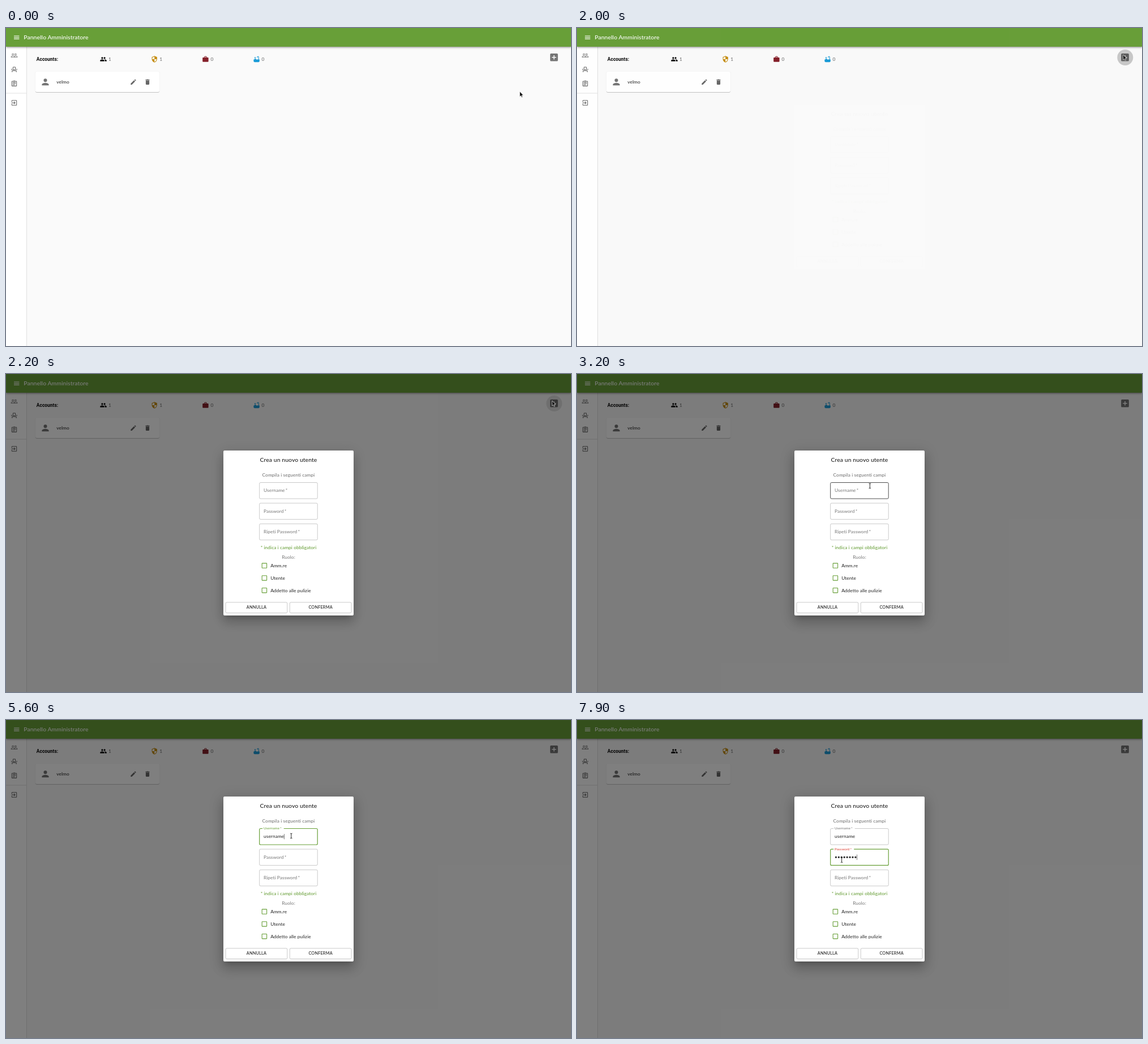
Recreate the animation shown at these times as an HTML page. Size 998x561 px, loop 8 s.

```html
<!DOCTYPE html>
<html lang="it">
<head>
<meta charset="utf-8">
<title>Pannello Amministratore</title>
<style>
html, body { margin: 0; width: 998px; height: 561px; overflow: hidden; background: #fafafa; }
body { position: relative; }
div, svg { position: absolute; left: 0; top: 0; }
svg { width: 998px; height: 561px; }
text { font: 400 8.32px Lato, Roboto, sans-serif; letter-spacing: .00938em; white-space: pre; }
.title { font-size: 10.4px; font-weight: 500; letter-spacing: .0075em; }
.head { font-family: Roboto, Arial, sans-serif; font-weight: 700; }
.mid { text-anchor: middle; }
.med { font-weight: 500; }
.button { font-size: 7.28px; font-weight: 500; letter-spacing: .02857em; text-anchor: middle; }
.help { font-size: 6.24px; letter-spacing: .03333em; }
#drawer { width: 37.4px; height: 561px; background: #fff; border-right: 1px solid #e0e0e0; box-sizing: border-box; }
#bar { width: 998px; height: 33.3px; background: #689f38;
  box-shadow: 0 1px 2px -.5px #0003, 0 2.1px 2.6px #00000024, 0 .5px 5.2px #0000001f; }
#card { left: 52px; top: 76.8px; width: 218.8px; height: 36.2px; background: #fff; border-radius: 2px;
  box-shadow: 0 1px .6px -.5px #0003, 0 .5px .6px #00000024, 0 .5px 1.6px #0000001f; }
#scrim { width: 998px; height: 561px; background: rgba(0, 0, 0, .5); }
#box { left: 383.6px; width: 230.8px; background: #fff; border-radius: 2px;
  box-shadow: 0 5.7px 7.8px -3.6px #0003, 0 12.5px 19.8px 1.6px #00000024, 0 4.7px 23.9px 4.2px #0000001f; }
</style>
</head>
<body>
<div id="drawer"></div>
<div id="bar"></div>
<div id="card"></div>
<svg id="page"></svg>
<svg><circle id="ripple" cx="968.3" cy="52" r="14"/></svg>
<div id="modal">
  <div id="scrim"></div>
  <div id="box"></div>
  <svg id="form"></svg>
</div>
<svg id="pointer"></svg>
<script>
const LOOP = 8000, STEP = 100;
const INK = 'rgba(0,0,0,.87)', GREY = 'rgba(0,0,0,.54)', GREEN = [104, 159, 56], RED = [220, 67, 56];
const $ = id => document.getElementById(id);
const clamp = v => Math.max(0, Math.min(1, v));
const span = (t, a, b) => clamp((t - a) / (b - a));
const smooth = k => k * k * (3 - 2 * k);
const mix = (a, b, k) => a + (b - a) * k;
const rgb = k => `rgb(${GREEN.map((g, i) => Math.round(mix(g, RED[i], k)))})`;

// Material standard curve, cubic-bezier(.4, 0, .2, 1)
function standard(x) {
  let lo = 0, hi = 1, u = .5;
  for (let i = 0; i < 24; i++) {
    u = (lo + hi) / 2;
    const bx = 1.2 * u * (1 - u) ** 2 + .6 * u * u * (1 - u) + u ** 3;
    if (bx < x) lo = u; else hi = u;
  }
  return 3 * u * u * (1 - u) + u ** 3;
}

const text = (x, y, s, cls = '', fill = INK, more = '') =>
  `<text x="${x}" y="${y}" class="${cls}" fill="${fill}" ${more}>${s}</text>`;
const icon = (name, cx, cy, fill, size = 12.5) =>
  `<path transform="translate(${cx - size / 2} ${cy - size / 2}) scale(${size / 24})" fill="${fill}" d="${icons[name]}"/>`;
const rect = (x, y, w, h, stroke, width, r = 2) =>
  `<rect x="${x}" y="${y}" width="${w}" height="${h}" rx="${r}" fill="none" stroke="${stroke}" stroke-width="${width}"/>`;

const icons = {
  menu: 'M3 18h18v-2H3zm0-5h18v-2H3zm0-7v2h18V6z',
  people: 'M16 11a3 3 0 1 0 0-6 3 3 0 0 0 0 6zm-8 0a3 3 0 1 0 0-6 3 3 0 0 0 0 6zm0 2c-2.33 0-7 1.17-7 3.5V19h14v-2.5c0-2.33-4.67-3.5-7-3.5zm8 0c-.29 0-.62.02-.97.05 1.16.84 1.97 1.97 1.97 3.45V19h6v-2.5c0-2.33-4.67-3.5-7-3.5z',
  group: 'M16.5 13c-1.2 0-3.07.34-4.5 1-1.43-.67-3.3-1-4.5-1C5.33 13 1 14.08 1 16.25V19h22v-2.75c0-2.17-4.33-3.25-6.5-3.25zm-4 4.5h-10v-1.25c0-.54 2.56-1.75 5-1.75s5 1.21 5 1.75v1.25zm9 0H14v-1.25c0-.46-.2-.86-.52-1.22.88-.3 1.96-.53 3.02-.53 2.44 0 5 1.21 5 1.75v1.25zM7.5 12a3.5 3.5 0 1 0 0-7 3.5 3.5 0 0 0 0 7zm0-5.5a2 2 0 1 1 0 4 2 2 0 0 1 0-4zm9 5.5a3.5 3.5 0 1 0 0-7 3.5 3.5 0 0 0 0 7zm0-5.5a2 2 0 1 1 0 4 2 2 0 0 1 0-4z',
  seat: 'M15 5v7H9V5h6m0-2H9c-1.1 0-2 .9-2 2v9h10V5c0-1.1-.9-2-2-2zm7 7h-3v3h3zM5 10H2v3h3zm15 5H4v6h2v-4h12v4h2z',
  tasks: 'M7 15h7v2H7zm0-4h10v2H7zm0-4h10v2H7zm12-4h-4.18a3 3 0 0 0-5.64 0H5a2 2 0 0 0-2 2v14a2 2 0 0 0 2 2h14a2 2 0 0 0 2-2V5a2 2 0 0 0-2-2zm-7-.25a.75.75 0 1 1 0 1.5.75.75 0 0 1 0-1.5zM19 19H5V5h14z',
  exit: 'M10.09 15.59L11.5 17l5-5-5-5-1.41 1.41L12.67 11H3v2h9.67zM19 3H5a2 2 0 0 0-2 2v4h2V5h14v14H5v-4H3v4a2 2 0 0 0 2 2h14a2 2 0 0 0 2-2V5a2 2 0 0 0-2-2z',
  shield: 'M12 1L3 5v6c0 5.55 3.84 10.74 9 12 5.16-1.26 9-6.45 9-12V5zm0 10.99h7c-.53 4.12-3.28 7.79-7 8.94V12H5V6.3l7-3.11z',
  work: 'M20 6h-4V4a2 2 0 0 0-2-2h-4a2 2 0 0 0-2 2v2H4a2 2 0 0 0-2 2v11a2 2 0 0 0 2 2h16a2 2 0 0 0 2-2V8a2 2 0 0 0-2-2zm-6 0h-4V4h4z',
  bath: 'M7 5a2 2 0 1 1 0 4 2 2 0 0 1 0-4zM20 13V4.83C20 3.27 18.73 2 17.17 2c-.75 0-1.47.3-2 .83l-1.25 1.25c-.5-.15-1.1-.1-1.59.24l2.76 2.76c.34-.5.4-1.1.25-1.59l1.25-1.25c.5-.5 1.41-.15 1.41.59V13h-6.85c-.3-.21-.57-.45-.82-.72l-1.4-1.55C7.6 9.3 5 10.2 5 12.25V13H2v6a2 2 0 0 0 2 2c0 .55.45 1 1 1h14c.55 0 1-.45 1-1a2 2 0 0 0 2-2v-6z',
  person: 'M12 12a4 4 0 1 0 0-8 4 4 0 0 0 0 8zm0 2c-2.67 0-8 1.34-8 4v2h16v-2c0-2.66-5.33-4-8-4z',
  edit: 'M3 17.25V21h3.75L17.81 9.94l-3.75-3.75zM20.71 7.04a1 1 0 0 0 0-1.41l-2.34-2.34a1 1 0 0 0-1.41 0l-1.83 1.83 3.75 3.75z',
  trash: 'M6 19a2 2 0 0 0 2 2h8a2 2 0 0 0 2-2V7H6zM19 4h-3.5l-1-1h-5l-1 1H5v2h14z',
  add: 'M19 3H5a2 2 0 0 0-2 2v14a2 2 0 0 0 2 2h14a2 2 0 0 0 2-2V5a2 2 0 0 0-2-2zm-2 10h-4v4h-2v-4H7v-2h4V7h2v4h4z'
};

function drawPage() {
  const counters = [['people', '#000', 1], ['shield', '#c68f12', 1], ['work', '#85202a', 0], ['bath', '#1a9bd7', 0]];
  const side = [['group', 48.3], ['seat', 73.2], ['tasks', 98.2], ['exit', 132]];
  $('page').innerHTML =
    icon('menu', 18.7, 16.5, '#fff') + text(31.2, 20, 'Pannello Amministratore', 'title', '#fff') +
    side.map(([n, y]) => icon(n, 14.5, y, '#666')).join('') +
    '<path d="M0 115H37" stroke="#e0e0e0"/>' +
    text(53.8, 58.3, 'Accounts:', 'head', '#000') +
    counters.map(([n, c, v], i) => icon(n, 172 + 90.2 * i, 55, c) + text(181 + 90.2 * i, 58.1, v, '', '#666')).join('') +
    icon('person', 69.5, 95.2, '#757575', 18.2) + text(89.2, 97.8, 'velmo', 'med', '#333') +
    icon('edit', 225, 95.2, '#666') + icon('trash', 250, 95.2, '#666') +
    icon('add', 968, 51.7, '#757575', 18.2);
}

// focus / blur / error on / error off, in ms
const fields = [
  { label: 'Username', top: 191.2, gap: 37.5, focus: 3350, blur: 6200, on: 4000, off: 4900,
    keys: [4000, 4200, 4400, 4600, 4900, 5000, 5100, 5200], help: ['Min 5 caratteri, max 16'] },
  { label: 'Password', top: 227.6, gap: 36, focus: 6150, blur: LOOP, on: 6700, off: 7900, secret: true,
    keys: [6700, 6900, 7100, 7300, 7400, 7600, 7700, 7900], help: ['Lunghezza password', 'necessaria da 8 a 16 caratteri'] },
  { label: 'Ripeti Password', top: 264, gap: 0, focus: LOOP, blur: LOOP, on: LOOP, off: LOOP, keys: [], help: [] }
];
const LEFT = 447.4, WIDE = 103.1, HIGH = 29.1, WORD = 'username';

// Row offsets caused by the help text under a failing field
function layout(t) {
  const bad = fields.findIndex(f => t >= f.on && t < f.off);
  const extra = bad < 0 ? 0 : 1.5 + 10.36 * fields[bad].help.length;
  return { bad, extra, up: -extra / 2, shift: i => (bad >= 0 && i > bad ? extra / 2 : -extra / 2) };
}

const route = [
  [0, 907.5, 112], [900, 907.5, 112], [1700, 964.6, 47], [2200, 964.6, 47], [2400, 699, 136],
  [2600, 699, 136], [3300, 506.7, 201], [5500, 506.7, 201], [6100, 467.6, 247], [LOOP, 467.6, 247]
];
function cursorAt(t) {
  const i = route.findIndex((p, n) => n && t <= p[0]);
  const [a, x, y] = route[i - 1], [b, u, v] = route[i];
  const k = smooth(span(t, a, b));
  return [mix(x, u, k), mix(y, v, k)];
}
function fieldUnder([x, y], lay) {
  return fields.findIndex((f, i) => {
    const top = f.top + lay.shift(i);
    return x > LEFT && x < LEFT + WIDE && y > top && y < top + HIGH;
  });
}

function drawField(f, i, t, lay, hover) {
  const active = t >= f.focus && t < f.blur, bad = lay.bad === i;
  const up = smooth(span(t, f.focus, f.focus + 150));
  const redness = span(t, f.on, f.on + 200) - span(t, f.off, f.off + 200);
  const line = bad ? rgb(1) : active ? rgb(0) : hover ? '#212121' : 'rgba(0,0,0,.27)';
  const count = f.keys.filter(k => t >= k).length;
  const base = f.top + 17.2;
  let s = rect(LEFT + .3, f.top + .3, WIDE - .6, HIGH - .6, line, active ? 1.2 : .8);
  if (up) s += `<path d="M453.2 ${f.top + .3}h${f.gap * up}" stroke="#fff" stroke-width="2"/>`;
  s += text(455, mix(base, f.top + 2, up), f.label + '\u2009*', '', active ? rgb(redness) : GREY,
    `style="font-size:${mix(8.32, 6.24, up)}px"`);
  if (f.secret) {
    for (let n = 0; n < count; n++) s += `<circle cx="${457.4 + 4.93 * n}" cy="${f.top + 14.5}" r="1.65" fill="${INK}"/>`;
  } else if (count) s += text(455, base, WORD.slice(0, count), 'value');
  if (active) s += `<path class="caret" d="M455.1 ${f.top + 9.8}v9.4" stroke="#222" stroke-width=".6"/>`;
  if (bad) s += f.help.map((h, n) => text(455, f.top + 38.1 + 10.36 * n, h, 'help', rgb(1))).join('');
  return `<g class="field" transform="translate(0 ${lay.shift(i)})">${s}</g>`;
}

function drawForm(t, lay, hover) {
  const roles = ['Amm.re', 'Utente', 'Addetto alle pulizie'];
  const button = (x, s) => rect(x, 402.8, 108.8, 18.7, 'rgba(0,0,0,.27)', .8) + text(x + 54.4, 414.2, s, 'button');
  $('box').style.top = 135.1 + lay.up + 'px';
  $('box').style.height = 290.9 + lay.extra + 'px';
  $('form').innerHTML =
    `<g transform="translate(0 ${lay.up})">` + text(499, 154.9, 'Crea un nuovo utente', 'title mid') +
    text(499, 181.3, 'Compila i seguenti campi', 'mid med', GREY) + '</g>' +
    fields.map((f, i) => drawField(f, i, t, lay, hover === i)).join('') +
    `<g transform="translate(0 ${lay.extra / 2})">` +
    text(499, 309.2, '* indica i campi obbligatori', 'mid med', rgb(0)) +
    text(499, 325.8, 'Ruolo:', 'mid', GREY) +
    roles.map((r, i) => rect(452.2, 333.9 + 21.8 * i, 8.4, 8.4, rgb(0), 1.1, .6) + text(467.2, 340.9 + 21.8 * i, r)).join('') +
    button(388, 'ANNULLA') + button(501.2, 'CONFERMA') + '</g>';

  document.querySelectorAll('.field').forEach((g, i) => {
    const caret = g.querySelector('.caret'), value = g.querySelector('.value');
    if (!caret) return;
    const done = fields[i].keys.filter(k => t >= k).length;
    const dx = fields[i].secret ? 4.93 * done : value ? value.getComputedTextLength() : 0;
    caret.setAttribute('transform', `translate(${dx} 0)`);
  });
}

function drawPointer([x, y], beam) {
  const arrow = '<path d="M0 0V9.2L2.1 7.3 3.4 10.4 4.9 9.8 3.6 6.8H6.4Z" fill="#111" stroke="#fff" stroke-width=".6"/>';
  const bar = '<path d="M-1.7-4.4Q0-4.4 0-3.4Q0-4.4 1.7-4.4M0-3.6V3.6M-1.7 4.4Q0 4.4 0 3.4Q0 4.4 1.7 4.4" fill="none" stroke="#111" stroke-width=".9"/>';
  $('pointer').innerHTML = `<g transform="translate(${x} ${y})">${beam ? bar : arrow}</g>`;
}

function render(t) {
  const fade = standard(span(t, 1987, 2212));
  const lay = layout(t), at = cursorAt(t);
  const hover = fade ? fieldUnder(at, lay) : -1;
  const press = span(t, 1800, 2000);
  $('ripple').setAttribute('r', mix(6, 14, press));
  $('ripple').setAttribute('opacity', .2 * press * (1 - span(t, 2050, 2350)));
  $('modal').style.opacity = fade;
  drawForm(t, lay, hover);
  drawPointer(at, hover >= 0);
}

let last = -1;
function tick(now) {
  const t = Math.floor((now % LOOP) / STEP) * STEP;
  if (t !== last) render(last = t);
  requestAnimationFrame(tick);
}
drawPage();
render(0);
requestAnimationFrame(tick);
</script>
</body>
</html>
```
